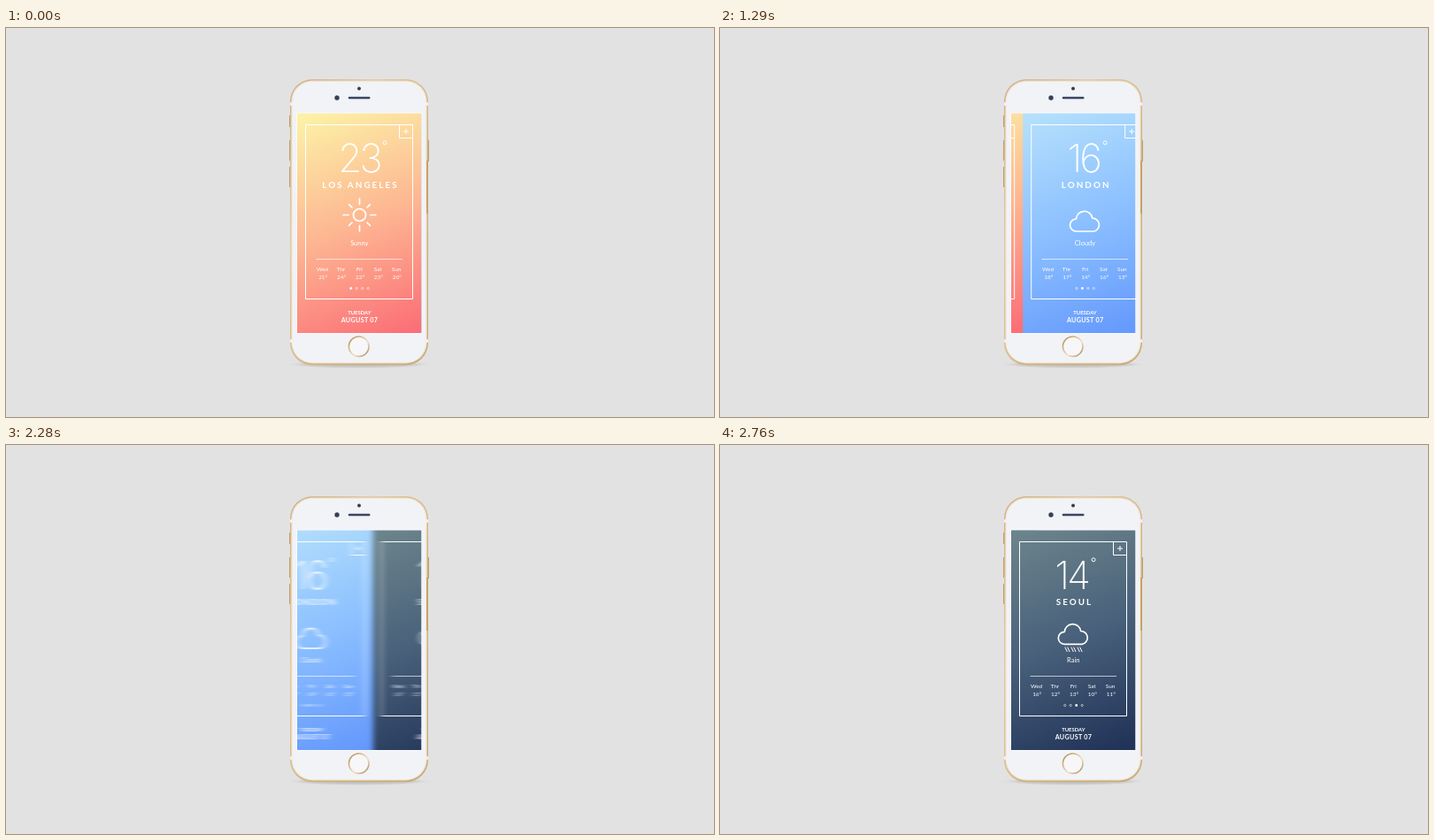
Write an HTML page that moves like this. It is 800x440 px and loops after 4.53 s.

```html
<!DOCTYPE html>
<html lang="en">
<head>
<meta charset="utf-8">
<title>Weather cards</title>
<style>
  html, body { margin: 0; width: 100%; height: 100%; overflow: hidden; background: #e2e2e2; }
  svg { display: block; width: 800px; height: 440px; }
  text { fill: #fff; text-anchor: middle; font-family: Lato, "Open Sans", sans-serif; }
  .temp { font: 200 44px Inter, Roboto, sans-serif; letter-spacing: -3px; }
  .city { font-size: 9.8px; font-weight: 700; letter-spacing: 2.1px; }
  .sky { font-size: 7.5px; }
  .day { font-size: 6.4px; }
  .weekday { font-size: 5.9px; font-weight: 700; }
  .date { font-size: 7.2px; font-weight: 700; letter-spacing: .3px; }
  .line { fill: none; stroke: #fff; }
  .icon { fill: none; stroke: #fff; stroke-width: 1.7; stroke-linecap: round; stroke-linejoin: round; }
</style>
</head>
<body>
<svg viewBox="0 0 800 440" xmlns="http://www.w3.org/2000/svg">
  <defs>
    <linearGradient id="gold" x1="0" y1="0" x2="1" y2="1">
      <stop offset="0" stop-color="#cdb083"/>
      <stop offset=".3" stop-color="#e3cba2"/>
      <stop offset=".6" stop-color="#d2b07a"/>
      <stop offset="1" stop-color="#c9a978"/>
    </linearGradient>
    <linearGradient id="ring" x1="0" y1="0" x2="1" y2="1">
      <stop offset="0" stop-color="#a98650"/>
      <stop offset=".35" stop-color="#d9bd8c"/>
      <stop offset=".6" stop-color="#f0e2c8"/>
      <stop offset="1" stop-color="#a07c48"/>
    </linearGradient>
    <radialGradient id="shade">
      <stop offset="0" stop-color="#a8a8a8" stop-opacity=".7"/>
      <stop offset=".75" stop-color="#b8b8b8" stop-opacity=".5"/>
      <stop offset="1" stop-color="#e2e2e2" stop-opacity="0"/>
    </radialGradient>
    <clipPath id="glass"><rect x="329" y="96.5" width="140.3" height="248.5"/></clipPath>
    <filter id="smear" filterUnits="userSpaceOnUse" x="309" y="90" width="180" height="262"
            color-interpolation-filters="sRGB">
      <feGaussianBlur id="blur" stdDeviation="0 0"/>
    </filter>
  </defs>

  <rect width="800" height="440" fill="#e2e2e2"/>
  <ellipse cx="399" cy="380.5" rx="84" ry="4.5" fill="url(#shade)"/>

  <g stroke="#b99a68" stroke-width="1.6">
    <path d="M320.9 99V112M320.9 127V150M320.9 157V180M477.1 127V151"/>
  </g>
  <rect x="321" y="58" width="156" height="323.2" rx="25" fill="url(#gold)"/>
  <rect x="322.3" y="59.4" width="153.4" height="320" rx="23.8" fill="#ebdfca"/>
  <rect x="323.4" y="60.6" width="151.2" height="317.8" rx="22.8" fill="#f2f3f7"/>
  <path d="M476 150V210" stroke="#c39a55" stroke-width="1.5"/>
  <path d="M321 86H323.6M474.4 86H477M321 354H323.6M474.4 354H477" stroke="#f5f3ef" stroke-width="3.5"/>
  <rect x="328" y="95.6" width="142.2" height="250.3" fill="#fafbfd"/>

  <circle cx="399" cy="68.6" r="2" fill="#3b3c49"/>
  <circle cx="374" cy="79" r="2.7" fill="#344059"/>
  <path d="M388 79H410.2" stroke="#3a4560" stroke-width="2.6" stroke-linecap="round"/>
  <circle cx="398.7" cy="360.3" r="11.3" fill="#f7f7f9" stroke="url(#ring)" stroke-width="1.5"/>

  <g clip-path="url(#glass)">
    <g id="lens"><g id="strip"></g></g>
  </g>
</svg>

<script>
const LOOP = 4530, STEP = 30, SLIDE = 630, WIDTH = 140, SHUTTER = 15;
const STARTS = [910, 2110];
const DAYS = ['Wed', 'Thr', 'Fri', 'Sat', 'Sun'];

const rays = Array.from({ length: 8 }, (_, i) => {
  const a = i * Math.PI / 4, end = i % 2 ? 16.8 : 18.3;
  const at = r => `${399.5 + r * Math.cos(a)} ${211.5 + r * Math.sin(a)}`;
  return `M${at(12.2)}L${at(end)}`;
}).join('');
const sun = `<circle cx="399.5" cy="211.5" r="7"/><path d="${rays}"/>`;
const cloud = '<path d="M389.3 230A7 7 0 0 1 389.3 216A9.2 9.2 0 0 1 407.6 215.2A7.45 7.45 0 0 1 409 230Z"/>';
const drops = [390, 397, 404].map(x => `M${x} 229l2.2 4.6M${x + 2.8} 229l2.2 4.6`).join('');
const rain = `<g transform="translate(0 -4.7)">${cloud}</g><path d="${drops}" stroke-width="1"/>`;

const cards = [
  { city: 'LOS ANGELES', temp: 23, x: 399, ring: 428, sky: 'Sunny', icon: sun,
    week: [21, 24, 22, 23, 20], colors: ['#fcf1a6', '#fdb692', '#fb7077'] },
  { city: 'LONDON', temp: 16, x: 397.5, ring: 422, sky: 'Cloudy', icon: cloud,
    week: [18, 17, 14, 16, 13], colors: ['#b4e0fc', '#8bbfff', '#6599fc'] },
  { city: 'SEOUL', temp: 14, x: 397, ring: 422, sky: 'Rain', icon: rain,
    week: [16, 12, 13, 10, 11], colors: ['#6b838b', '#48607a', '#213358'] }
];

const label = (cls, x, y, s) => `<text class="${cls}" x="${x}" y="${y}">${s}</text>`;

function drawCard(card, n) {
  const stops = card.colors.map((c, i) => `<stop offset="${i / 2}" stop-color="${c}"/>`).join('');
  const week = DAYS.map((d, i) => {
    const x = 357.5 + i * 20.9;
    return label('day', x, 274.5, d) + label('day', x + .7, 283.5, card.week[i] + '°');
  }).join('');
  const dots = [0, 1, 2, 3].map(i => {
    const place = `cx="${389.7 + i * 6.5}" cy="294.5"`;
    return i === n ? `<circle ${place} r="1.4" fill="#fff"/>`
                   : `<circle ${place} r="1.1" class="line" stroke-width=".7" opacity=".85"/>`;
  }).join('');
  // backgrounds overrun the card so that the blur never meets an empty edge
  const left = n ? 329 : 299;
  return `<g transform="translate(${n * WIDTH} 0)">
    <linearGradient id="bg${n}" gradientUnits="userSpaceOnUse" x1="349" y1="96" x2="449" y2="345">${stops}</linearGradient>
    <rect x="${left}" y="85" width="${499 - left}" height="272" fill="url(#bg${n})"/>
    <path class="line" d="M338.5 109.5H459.5V306.5H338.5ZM444.5 109.5V124.5H459.5"/>
    <path class="line" d="M449 117H455M452 114V120"/>
    ${label('temp', card.x, 163, card.temp)}
    <circle class="line" cx="${card.ring}" cy="129.8" r="2"/>
    ${label('city', 400.5, 181, card.city)}
    <g class="icon">${card.icon}</g>
    ${label('sky', 399.3, 246, card.sky)}
    <path class="line" d="M350.5 261.5H448" opacity=".65"/>
    ${week}${dots}
    ${label('weekday', 399.3, 323.5, 'TUESDAY')}
    ${label('date', 399.5, 333, 'AUGUST 07')}
  </g>`;
}

const strip = document.getElementById('strip');
const lens = document.getElementById('lens');
const blur = document.getElementById('blur');
strip.innerHTML = cards.map(drawCard).join('');

// cubic-bezier(.385, 0, .1, 1)
function ease(x) {
  if (x <= 0) return 0;
  if (x >= 1) return 1;
  let lo = 0, hi = 1;
  for (let i = 0; i < 30; i++) {
    const u = (lo + hi) / 2, v = 1 - u;
    if (3 * u * v * v * .385 + 3 * u * u * v * .1 + u * u * u < x) lo = u; else hi = u;
  }
  return lo * lo * (3 - 2 * lo);
}

const shift = t => WIDTH * STARTS.reduce((sum, s) => sum + ease((t - s) / SLIDE), 0);

function render(time) {
  const t = Math.floor((time % LOOP) / STEP) * STEP;
  const smear = (shift(t + SHUTTER / 2) - shift(t - SHUTTER / 2)) / Math.sqrt(12);
  strip.setAttribute('transform', `translate(${-shift(t).toFixed(2)} 0)`);
  if (smear > .1) {
    blur.setAttribute('stdDeviation', `${smear.toFixed(2)} 0`);
    lens.setAttribute('filter', 'url(#smear)');
  } else {
    lens.removeAttribute('filter');
  }
}

const start = performance.now();
function tick() {
  render(performance.now() - start);
  requestAnimationFrame(tick);
}
tick();
</script>
</body>
</html>
```
